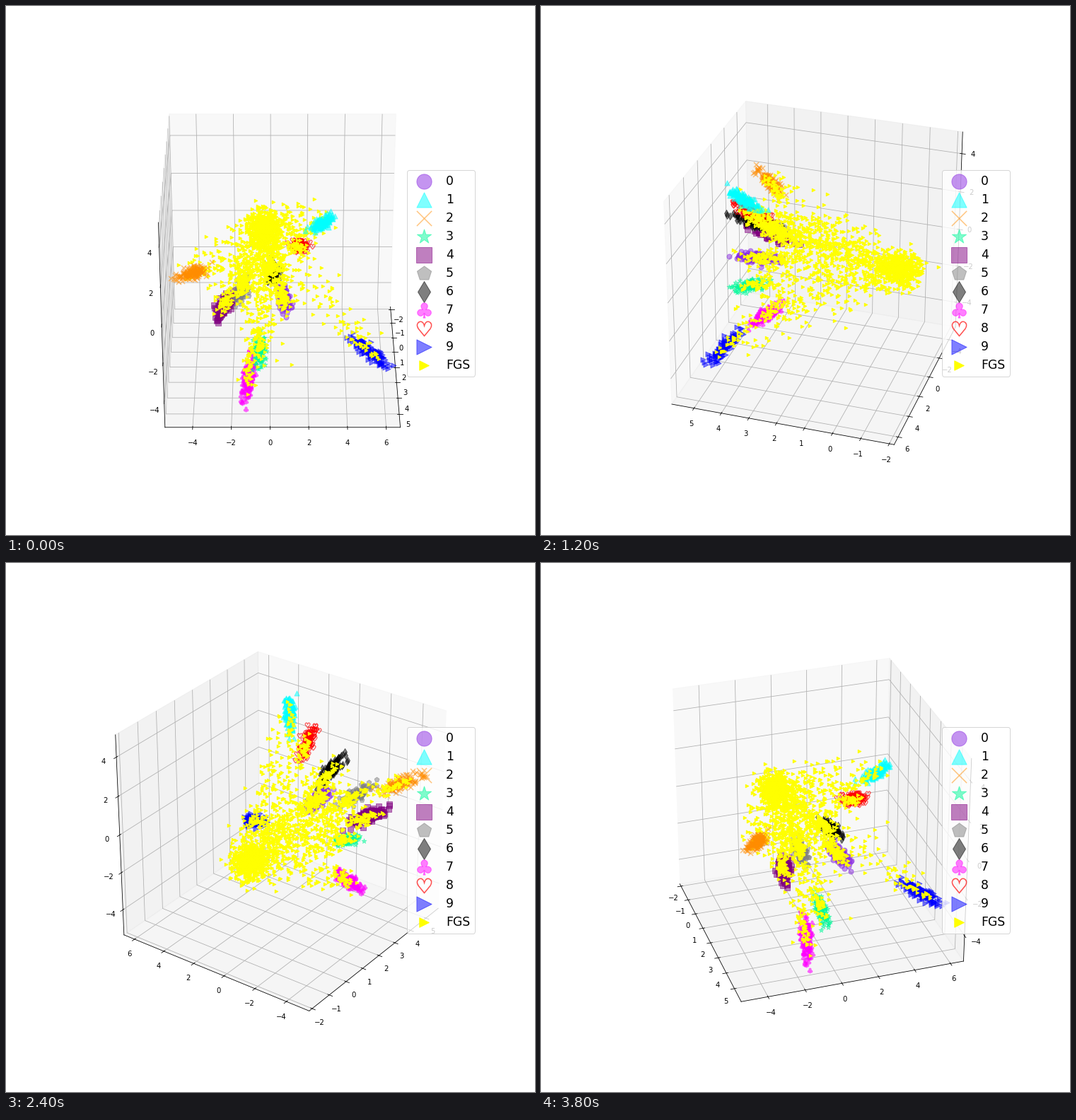
Animation of 748x748 px, one loop 4000 ms. Source, as a matplotlib script:

```python
import numpy as np
import matplotlib.pyplot as plt
from matplotlib.animation import FuncAnimation

FRAMES = 20
STEP = 360 / FRAMES
rng = np.random.default_rng(7)

# The cloud is modelled in a unit cube, then scaled to data units.
CENTER = np.array([1.825, 0.65, -0.13])
SCALE = np.array([7.67, 11.674, 10.08])
CORE = np.array([-.377, -.086, .01])

# marker, color, middle of the group
GROUPS = [
    ("o", "blueviolet", (.30, .006, .005)),
    ("^", "cyan", (.29, .171, .397)),
    ("x", "darkorange", (.363, -.395, .182)),
    ("*", "mediumspringgreen", (.37, -.103, -.22)),
    ("s", "purple", (.31, -.257, -.012)),
    ("p", "gray", (.31, -.18, .07)),
    ("d", "black", (.305, -.046, .16)),
    (r"$\clubsuit$", "magenta", (.31, -.155, -.399)),
    (r"$\heartsuit$", "red", (.296, .075, .278)),
    (">", "blue", (.31, .39, -.255)),
]
MIDDLES = np.array([g[2] for g in GROUPS])

# Streaks fan out from the core; the farther off its axis, the steeper.
offset = MIDDLES - CORE
offset[:, 0] = 0
reach = np.linalg.norm(offset, axis=1)
AXES = .3 * offset
AXES[:, 0] = .22 - .25 * reach
WEIGHTS = 1 / (.1 + reach)
WEIGHTS /= WEIGHTS.sum()


def noise(n, sigma):
    return rng.normal(0, sigma, (n, 3))


def streak(k, shift=0):
    """Points around the groups k, moved along each group's axis."""
    n = len(k)
    t = rng.normal(shift, .27, (n, 1))
    return MIDDLES[k] + AXES[k] * t + noise(n, .013)


def core(n):
    points = CORE + noise(n, .037)
    points[:, 0] += rng.exponential(.04, n) - .02
    return points


def fan(n):
    """Paths from the core that open out towards and between the groups."""
    i = rng.choice(len(GROUPS), n, p=WEIGHTS)
    j = rng.integers(len(GROUPS), size=n)
    mix = rng.beta(.4, .6, (n, 1))
    goal = MIDDLES[i] + (MIDDLES[j] - MIDDLES[i]) * mix - [.05, 0, 0]
    t = rng.uniform(0, 1, (n, 1)) ** .7
    bend = np.hstack([t, t ** .7, t ** .7])
    return CORE + (goal - CORE) * bend + noise(n, .033)


def generated():
    own = streak(rng.choice(len(GROUPS), 500, p=WEIGHTS), shift=-.25)
    return np.vstack([core(520), fan(950), own])


def scatter(points, **style):
    ax.scatter(*(CENTER + points * SCALE).T, depthshade=False, **style)


fig = plt.figure(figsize=(10.389, 10.389), dpi=72)
ax = fig.add_subplot(projection="3d")
ax.apply_aspect = lambda position=None: None  # fill the whole subplot area

for k, (marker, color, _) in enumerate(GROUPS):
    scatter(streak(np.full(130, k)), s=50, marker=marker, c=color,
            alpha=.5, label=str(k))
scatter(generated(), s=20, marker=">", c="yellow", label="FGS")

low, high = CENTER - SCALE * 25 / 48, CENTER + SCALE * 25 / 48
ax.set(xlim=(low[0], high[0]), ylim=(low[1], high[1]), zlim=(low[2], high[2]),
       xticks=range(-2, 6), yticks=range(-4, 7, 2), zticks=range(-4, 5, 2))
ax.set_box_aspect((1, 1, 1), zoom=.94675)
ax.legend(loc="right", fontsize="xx-large", markerscale=3,
          labelspacing=.463, borderaxespad=.58)


def update(i):
    azim = STEP * i
    # tiny nudge so that head-on views choose a definite side pane
    ax.view_init(30, azim + 1e-4 * np.sin(np.radians(45 - azim)))
    return []


anim = FuncAnimation(fig, update, frames=FRAMES, interval=200,
                     init_func=lambda: [], repeat=True, repeat_delay=0)
plt.show()
```
